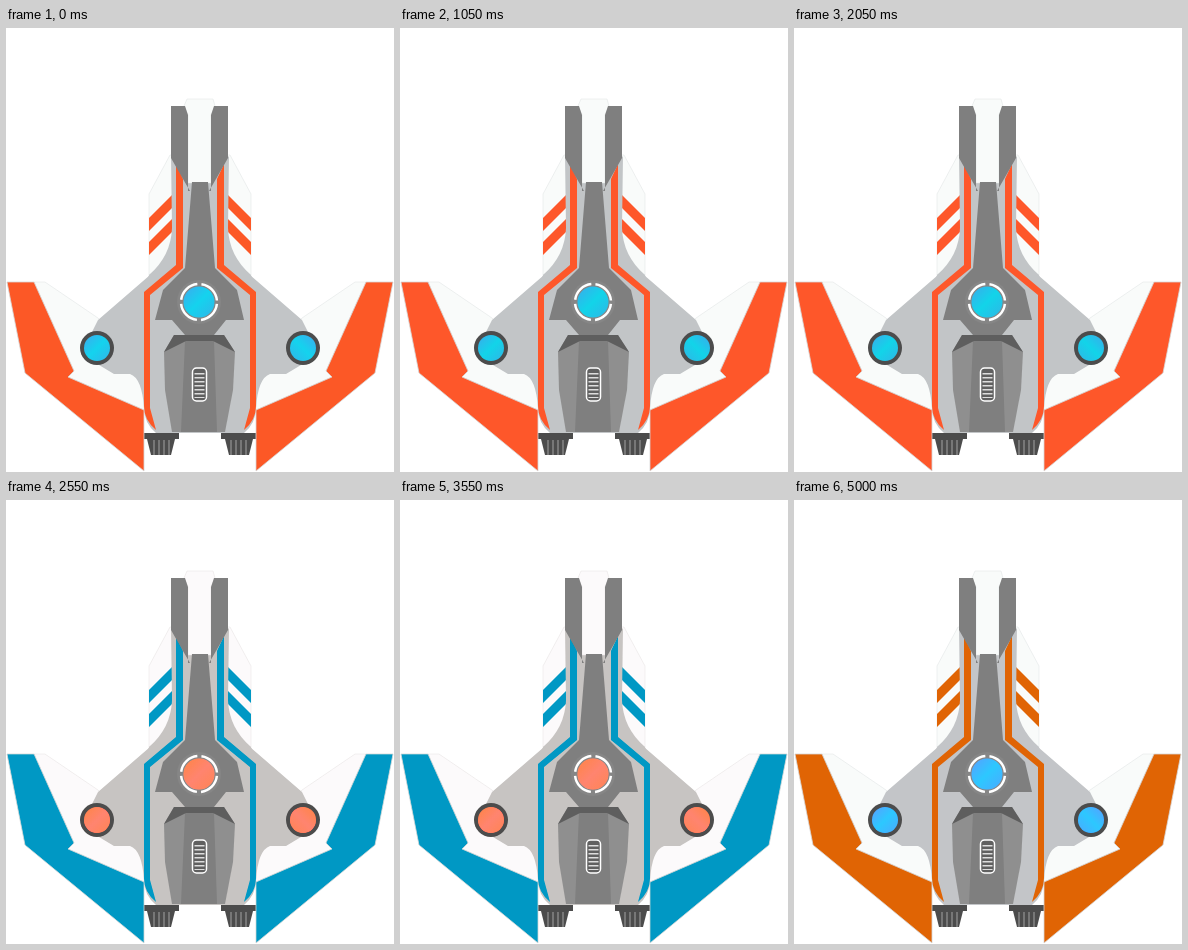
These frames come from a looping animation (388 by 444 pixels, 5050 ms). An HTML page:

```html
<!DOCTYPE html>
<html>
<head>
<meta charset="utf-8">
<style>
  html, body { margin: 0; width: 100%; height: 100%; overflow: hidden; background: #fff; }
  svg { display: block; width: 388px; height: 444px; }
  .accent { fill: #fc5826; }
  .wing { stroke: #d6d6d6; stroke-width: .8; }
  .white { fill: #f9fbfa; stroke: #dde0e0; stroke-width: .5; }
  .light { fill: #c2c5c7; }
  .dark { fill: #7f7f7f; }
  .deep { fill: #4c4c4c; }
</style>
</head>
<body>
<svg id="ship" viewBox="0 0 388 444">
  <defs>
    <linearGradient id="glow" x1="0" y1="0" x2="1" y2="1">
      <stop offset=".1" stop-color="#35b2ee"/>
      <stop offset=".5" stop-color="#14d3ee"/>
      <stop offset=".9" stop-color="#2cbbea"/>
    </linearGradient>
    <g id="half">
      <!-- engine -->
      <path class="deep" d="M138 405H173V411H169L165 427H145L141 411H138Z"/>
      <path d="M148 412V427M153 412V427M158 412V427M163 412V427" stroke="#858585" stroke-width="1.5"/>
      <!-- wing -->
      <path class="white" d="M28 254H39L92 290L138 340V382L62 349L68 343Z"/>
      <path class="light" d="M144 247L92 292L78 320L88 334L108 346H124Q136 350 138 380L146 378V247Z"/>
      <path class="accent wing" d="M1 254H28L68 343L62 349L138 382V443L19 345Z"/>
      <circle class="deep" cx="91" cy="320" r="17"/>
      <circle cx="91" cy="320" r="13" fill="url(#glow)"/>
      <!-- shoulder -->
      <path class="white" d="M164 127L143 166V247L168 236V127Z"/>
      <path class="accent" d="M143 190L166 167V180L143 203ZM143 214L166 191V204L143 227Z"/>
      <path class="light" d="M165 128L194 160V405H150Q138 395 138 380V262L143 247Q165 228 166 200Z"/>
      <!-- trim -->
      <path class="accent" d="M170 136L177 151V240L144 267V380L150 402Q138 392 138 378V264L170 237Z"/>
    </g>
    <path id="barrel" class="dark" d="M165 78H179L182 87V163H184L177 151L165 130Z"/>
  </defs>

  <use href="#half"/>
  <use href="#half" transform="matrix(-1 0 0 1 388 0)"/>

  <path class="white" d="M181 71H207L209 78L205 87V155H182V87L178 78Z"/>
  <use href="#barrel"/>
  <use href="#barrel" transform="matrix(-1 0 0 1 387 0)"/>

  <path class="dark" d="M186 154H202L209 240L231 262L238 292H220L208 307H179L166 292H149L157 262L179 240Z"/>
  <circle cx="193" cy="274" r="22" fill="#868686"/>
  <circle cx="193" cy="274" r="18" fill="none" stroke="#fff" stroke-width="2.5" stroke-dasharray="24 4.27" stroke-dashoffset="-2"/>
  <circle cx="193" cy="274" r="15.5" fill="url(#glow)"/>

  <!-- rear hull -->
  <path d="M168 307H218L229 324L227 362L219 404H166L159 362L158 324Z" fill="#8f8f8f"/>
  <path class="dark" d="M179 313H208L211 404H175Z"/>
  <path d="M168 307H218L229 324L207 313H180L158 324Z" fill="#5e5e5e"/>
  <rect x="186.5" y="340" width="14" height="33" rx="4" fill="#606060" stroke="#fff" stroke-width="1.5"/>
  <path d="M193.5 345V370" stroke="#ddd" stroke-width="10" stroke-dasharray="1.5 2.5"/>
</svg>
<script>
  const ship = document.getElementById('ship');
  const LOOP = 5050, STEP = 50, DEGREES = 18;

  function draw() {
    const tick = Math.floor(performance.now() % LOOP / STEP);
    // The colour wheel turns backwards, one turn per second, after a still first tick.
    const hue = tick ? -DEGREES * (tick - 0.9) : 0;
    ship.style.filter = `hue-rotate(${hue}deg)`;
    requestAnimationFrame(draw);
  }
  draw();
</script>
</body>
</html>
```
